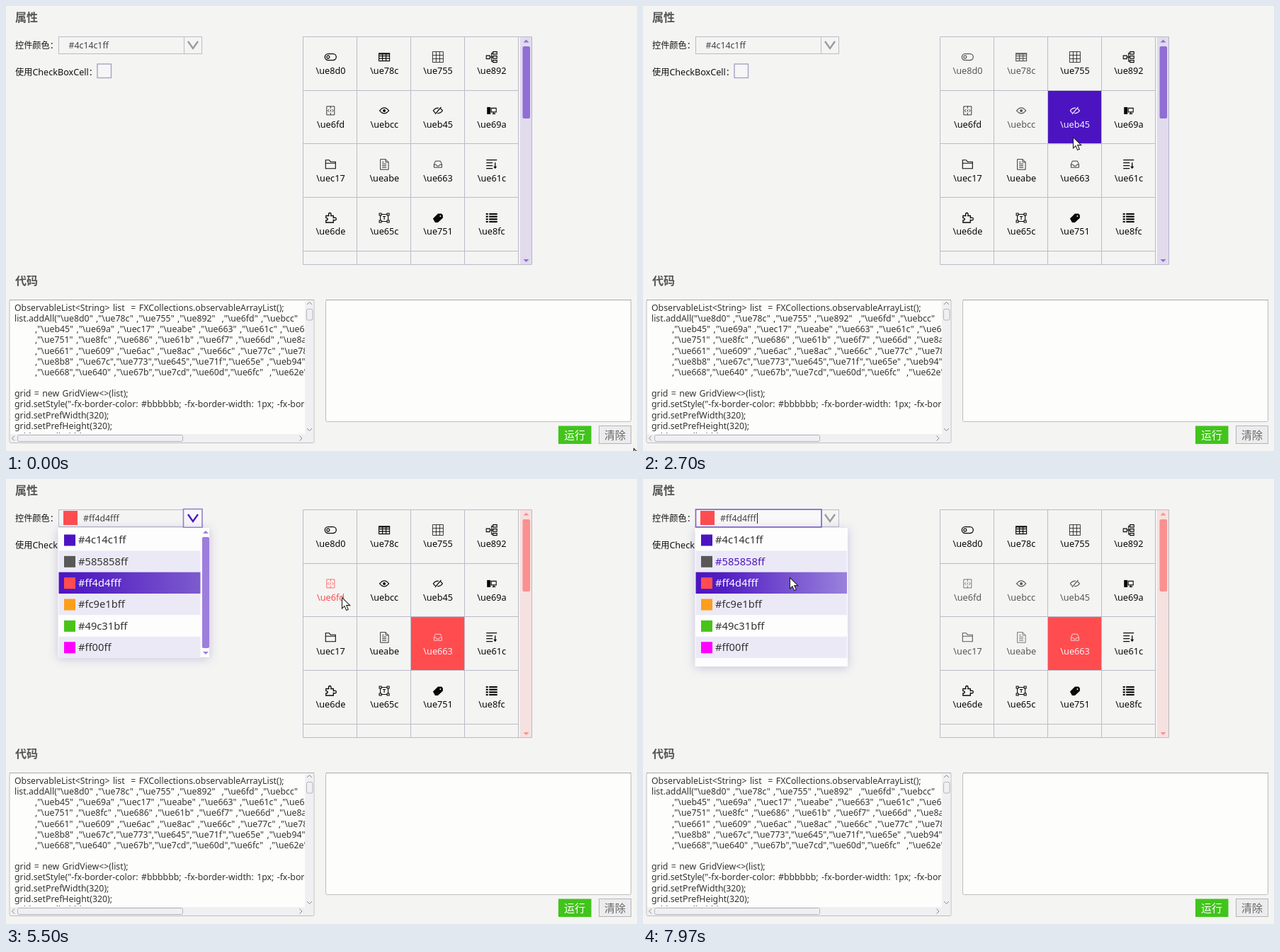
Write an HTML page that moves like this. It is 891 px wide and 629 px high and loops after 8000 ms.

```html
<!DOCTYPE html>
<html lang="zh-CN">
<head>
<meta charset="utf-8">
<title>GridView</title>
<style>
  html, body { margin: 0; width: 100%; height: 100%; overflow: hidden; background: #f4f4f3; }
  svg { display: block; width: 100%; height: 100%; --accent: #4c14c1;
        font: 12.3px "Noto Sans", "Noto Sans CJK SC", "Noto Sans CJK", sans-serif; }
  text { white-space: pre; }
  .title { font-size: 16px; font-weight: bold; fill: #555; }
  .label { font-size: 12.2px; fill: #111; }
  .edge { fill: none; stroke: #bcbbc8; }
  .cells text { font-size: 12.7px; text-anchor: middle; fill: currentColor; }
  .cells .bg { fill: none; }
  .icon { fill: none; stroke: currentColor; stroke-width: 1.1; }
  .solid { fill: currentColor; stroke: none; }
  .thumb { fill: var(--accent); opacity: .54; }
  .track { fill: var(--accent); opacity: .11; }
  .purple { --accent: #4c14c1; }
  .code { word-spacing: 1.2px; fill: #333; }
  .area { fill: #fdfdfc; stroke: #bdbdc0; }
  .bar { fill: #f0f0f2; }
  .grip { fill: #f0f0f3; stroke: #b4b4bc; }
  .tick { fill: none; stroke: #888; }
  .rows text { font-size: 14.7px; }
  .popup { filter: drop-shadow(0 2px 7px rgba(70, 50, 140, .25)); }
  .button { font-size: 15px; text-anchor: middle; }
</style>
</head>
<body>
<svg viewBox="0 0 891 629" preserveAspectRatio="none">
  <defs>
    <clipPath id="codeClip"><rect x="6" y="417" width="416" height="187"/></clipPath>
    <linearGradient id="shine">
      <stop offset="0" stop-color="#4c14c1"/>
      <stop offset=".2" stop-color="#5320c3"/>
      <stop id="shineEnd" offset="1"/>
    </linearGradient>
  </defs>
  <rect width="891" height="629" fill="#f4f4f3"/>

  <text class="title" x="13" y="22">属性</text>
  <text class="title" x="13" y="394">代码</text>
  <text class="label" x="13" y="60">控件颜色：</text>
  <text class="label" x="13" y="98">使用<tspan font-size="12.6">CheckBoxCell</tspan>：</text>
  <rect id="check" x="129" y="82" width="19.5" height="19.5" fill="#f6f6f6" stroke-width="1.4"/>

  <rect class="edge" x="74.5" y="43.5" width="202" height="24"/>
  <path class="edge" d="M251.5 43v25"/>
  <rect id="focus" x="74.5" y="43" width="177.5" height="25" fill="#f8f8f8" stroke="#7a60c9" stroke-width="1.6"/>
  <rect id="buttonFocus" x="250.5" y="42.5" width="26.5" height="26" fill="#f8f7fc" stroke="#9381cf" stroke-width="1.6"/>
  <path id="chevron" d="M257 50l7 10 7-10" fill="none" stroke-width="2.4"/>
  <rect id="swatch" x="81" y="45" width="20" height="20" fill="#ff4d4f"/>
  <text id="value" y="60" fill="#444"></text>
  <path id="caret" d="M161.5 48v15" stroke="#222"/>

  <g id="cells" class="cells"></g>
  <path class="edge" d="M419.5 43.5H742.5V365.5H419.5zM420 119.5H723M420 194.5H723M420 270.5H723M420 346.5H723
    M495.5 44V365M571.5 44V365M647.5 44V365M723.5 44V365"/>
  <rect class="track" x="726" y="44" width="16.5" height="321"/>
  <rect class="thumb" x="729.5" y="57" width="10.5" height="102" rx="2"/>
  <path class="thumb" d="M730.5 51.5l4-4 4 4zM730.5 358l4 4 4-4z"/>

  <rect class="area" x="5" y="415.5" width="430" height="202" rx="2"/>
  <g id="code" class="code" clip-path="url(#codeClip)"></g>
  <path class="bar" d="M422 417h12v188h-12zM6 605h428v12H6z"/>
  <rect class="grip" x="424.5" y="428.5" width="8.5" height="15.5" rx="2"/>
  <rect class="grip" x="16.5" y="606.5" width="233" height="9" rx="2"/>
  <path class="tick" d="M425 422l3.5-3.5 3.5 3.5M425 597l3.5 3.5 3.5-3.5M12 607.5l-3.5 3.5 3.5 3.5M414.5 607.5l3.5 3.5-3.5 3.5"/>

  <rect class="area" x="451.5" y="415.5" width="431" height="172" rx="2"/>
  <path d="M5 415.5H435M452 415.5H883" stroke="#a9a9ae"/>
  <rect x="780" y="593.5" width="46.5" height="25.5" fill="#41c41b"/>
  <text class="button" x="803" y="612" fill="#fff">运行</text>
  <rect x="837.5" y="593.5" width="45" height="25" fill="#ececee" stroke="#b5b5b9"/>
  <text class="button" x="860" y="612" fill="#666">清除</text>

  <g id="popup" class="purple">
    <rect id="sheet" class="popup" x="73.5" y="69" fill="#fdfdfd"/>
    <g id="rows" class="rows"></g>
    <g id="popupBar">
      <rect class="thumb" x="277" y="82" width="10" height="157" rx="2"/>
      <path class="thumb" d="M278 77l4-4 4 4zM278 244l4 4 4-4z"/>
    </g>
  </g>
  <path id="cursor" d="M.5.5v15.5l3.5-3.4 2.6 6 2.7-1.2-2.6-5.8h5z" fill="#fff" stroke="#222" stroke-width="1.1"/>
</svg>
<script>
const $ = id => document.getElementById(id);
const set = (el, attrs) => { for (const k in attrs) el.setAttribute(k, attrs[k]); return el; };
const add = (parent, tag, attrs = {}, content = '') => {
  const el = set(document.createElementNS('http://www.w3.org/2000/svg', tag), attrs);
  if (tag === 'text') el.textContent = content; else el.innerHTML = content;
  return parent.appendChild(el);
};
const show = (id, on) => { $(id).style.display = on ? '' : 'none'; };

const path = (d, width = 1.1) => `<path d="${d}" stroke-width="${width}"/>`;
const thin = d => path(d, .8);
const solid = d => `<path d="${d}" class="solid"/>`;

const icons = [
  ['e8d0', path('M-3.5-4.5H3.5a4.5 4.5 0 0 1 0 9H-3.5a4.5 4.5 0 0 1 0-9z', 1.3) + path('M-1.5 0a2 2 0 1 1-4 0a2 2 0 1 1 4 0z')],
  ['e78c', path('M-7.5-5h15V5.500h-15zM-7.500-1.500h15M-7.500 2h15M-2.500-5V5.500M2.500-5V5.500'.replace(/00/g, '')) + solid('M-8-5.500H8v2H-8z')],
  ['e755', thin('M-7.5-7.5h15v15h-15zM-7.5-2.5h15M-7.5 2.5h15M-2.5-7.5v15M2.5-7.5v15')],
  ['e892', path('M-7.5-2h5v4.500h-5zM2-7.5h5.5v3.500H2zM2-1.500h5.500v3.500H2zM2 4.500h5.500v3H2zM-2.500 0H2M2-5.500H0V6H2')],
  ['e6fd', thin('M-5.5-6h11v12h-11zM0-6v3M0-1.5v3M0 3v3M-2-2l-2 2 2 2M2-2l2 2-2 2')],
  ['ebcc', path('M-6.5 0Q0-8 6.5 0Q0 8-6.5 0z', 1.3) + solid('M-2 0a2 2 0 1 0 4 0a2 2 0 1 0-4 0z')],
  ['eb45', path('M1-3.8Q-4-4-6.5 0Q-5.5 2-3.5 3M-1 3.8Q4 4 6.5 0Q5.5-2 3.5-3') + path('M-4 5L4.5-5M-1 1.5L1.5-1.5', 1.3)],
  ['e69a', solid('M-6.5-5h5V5h-5z') + path('M-.5-3.500h7V2h-7zM3 2v2.500M1 4.500h4.500')],
  ['ec17', path('M-7 6v-12h5l2 2.5H7V6zM-7-1.5H7')],
  ['eabe', thin('M-5.5-7H2l4 4V7.5H-5.5zM2-7v4h4M-3-.5H3M-3 2H3M-3 4.5H3M-3-3H-.5')],
  ['e663', thin('M-5.5 0l2-4.5h7l2 4.5v4.5h-11zM-5.5.5h3l1 2h3l1-2h3')],
  ['e61c', path('M-7.5-6h15M-7.5-2h9M-7.5 2h9M-7.5 6h9M5-2.5v7', 1.3) + solid('M2.5 3h5L5 6.5z')],
  ['e6de', path('M-6.5-3h4q-1-4 1.5-4t1.5 4H4v3q4-1 4 1.5T4 3v3.5H-6.500v-3q2.500 0 2.500-1.700t-2.500-1.700z', 1.3)],
  ['e65c', path('M-7-6.500h3v3h-3zM4-6.500h3v3H4zM-7 3.500h3v3h-3zM4 3.500h3v3H4zM-4-5H4M-4 5H4M-5.500-3.500v7M5.500-3.500v7M-2-2h4M0-2v4.500')],
  ['e751', solid('M-7 1L0-6H5L7-4V0L0 6.5H-4z') + '<circle cx="3.5" cy="-2.5" r="1" fill="#f4f4f3" stroke="none"/>'],
  ['e8fc', path('M-8-5.500h3M-3.500-5.500H8M-8-1.800h3M-3.500-1.800H8M-8 1.900h3M-3.500 1.900H8M-8 5.500h3M-3.500 5.500H8', 2.2)]
];
const CELL = 75.8, LEFT = 420, TOP = 43.5;

const cells = icons.map(([name, art], i) => {
  const x = LEFT + (i % 4) * CELL, y = TOP + Math.floor(i / 4) * CELL;
  const group = add($('cells'), 'g');
  const bg = add(group, 'rect', { class: 'bg', x, y, width: CELL, height: CELL });
  add(group, 'g', { class: 'icon', transform: `translate(${x + 38.3} ${y + 28.6})` }, art);
  add(group, 'text', { x: x + 38.5, y: y + 52.5 }, '\\u' + name);
  return { group, bg };
});

const codeLines = String.raw`ObservableList<String> list  = FXCollections.observableArrayList();
list.addAll("\ue8d0" ,"\ue78c" ,"\ue755" ,"\ue892"  ,"\ue6fd" ,"\uebcc"
,"\ueb45" ,"\ue69a" ,"\uec17" ,"\ueabe" ,"\ue663" ,"\ue61c" ,"\ue6de"
,"\ue751" ,"\ue8fc" ,"\ue686" ,"\ue61b" ,"\ue6f7" ,"\ue66d" ,"\ue8ac"
,"\ue661" ,"\ue609" ,"\ue6ac" ,"\ue8ac" ,"\ue66c" ,"\ue77c" ,"\ue78c"
,"\ue8b8" ,"\ue67c","\ue773","\ue645","\ue71f","\ue65e" ,"\ueb94"
,"\ue668","\ue640" ,"\ue67b","\ue7cd","\ue60d","\ue6fc"  ,"\ue62e"

grid = new GridView<>(list);
grid.setStyle("-fx-border-color: #bbbbbb; -fx-border-width: 1px; -fx-border
grid.setPrefWidth(320);
grid.setPrefHeight(320);
grid.setCellWidth(75);`.split('\n');
codeLines.forEach((line, i) =>
  add($('code'), 'text', { x: line[0] === ',' ? 41 : 12, y: 431 + i * 15.16 }, line));

const colors = ['#4c14c1ff', '#585858ff', '#ff4d4fff', '#fc9e1bff', '#49c31bff', '#ff00ff'];
const ROW = 30.35, ROWS_TOP = 71;
const rows = colors.map((color, i) => {
  const y = ROWS_TOP + i * ROW;
  const bg = add($('rows'), 'rect', { x: 74.5, y, height: ROW });
  add($('rows'), 'rect', { x: 82, y: y + 7.5, width: 16, height: 16, fill: color.slice(0, 7) });
  return { bg, label: add($('rows'), 'text', { x: 102, y: y + 20.3 }, color) };
});

// Pointer legs: start, end, target x, y, optional bend x, y
const LOOP = 8000, RECOLOR = 4700, REOPEN = 7720;
const start = [886, 625];
const legs = [
  [30, 800, 217, 110, 300, 600],
  [930, 1570, 460, 87, 340, 10],
  [1800, 2600, 607, 185],
  [2700, 3030, 605, 238],
  [3200, 3630, 261, 53, 440, 205],
  [3870, 4070, 220, 99],
  [4070, 4670, 205, 148],
  [4700, 5500, 474, 167],
  [5530, 6330, 604, 225, 610, 150],
  [6370, 6930, 136, 124],
  [6930, 7130, 139, 96],
  [7470, 7690, 204, 56],
  [REOPEN, 7970, 207, 139]
];

function pointer(t) {
  let [x, y] = start;
  for (const [from, to, tx, ty, bx = (x + tx) / 2, by = (y + ty) / 2] of legs) {
    if (t < from) break;
    const p = Math.min(1, (t - from) / (to - from));
    const k = from === REOPEN ? p : p * p * (3 - 2 * p), r = 1 - k;
    x = r * r * x + 2 * r * k * bx + k * k * tx;
    y = r * r * y + 2 * r * k * by + k * k * ty;
    if (p < 1) break;
  }
  return [x, y];
}

function cellAt(t) {
  const [x, y] = pointer(t);
  const col = Math.floor((x - LEFT) / CELL), row = Math.floor((y - TOP) / CELL);
  return col >= 0 && col < 4 && row >= 0 && row < 4 ? row * 4 + col : -1;
}

function draw(t) {
  const red = t >= RECOLOR;
  const accent = red ? '#ff4d4f' : '#4c14c1';
  document.querySelector('svg').style.setProperty('--accent', accent);

  const [x, y] = pointer(t);
  set($('cursor'), { transform: `translate(${x} ${y})` });

  // Cells left by the pointer stay grey until the accent changes
  const visited = new Set();
  for (let s = red ? RECOLOR : 0; s < t; s += 10) visited.add(cellAt(s));
  const hover = cellAt(t);
  const selected = t < 2680 ? -1 : t < 3200 ? 6 : 10;
  cells.forEach(({ group, bg }, i) => {
    bg.style.fill = i === selected ? accent : 'none';
    group.style.color = i === selected ? '#f4f0fb' : i === hover ? accent : visited.has(i) ? '#585858' : '#080808';
  });

  const dropped = t >= 3870 && t < 5530;
  const editing = t >= REOPEN;
  const overButton = x > 251 && x < 277 && y > 43 && y < 68;
  const active = dropped || overButton;
  show('buttonFocus', active);
  set($('chevron'), { stroke: active ? '#4c14c1' : '#9b9b9f' });
  show('focus', editing);
  show('caret', editing);
  show('swatch', red);
  $('value').textContent = red ? colors[2] : colors[0];
  set($('value'), { x: red ? 109 : 88.5 });
  const overCheck = x > 129 && x < 149 && y > 82 && y < 102;
  set($('check'), { stroke: overCheck ? '#7a60c9' : '#aaa3c2' });

  show('popup', dropped || editing);
  show('popupBar', dropped);
  set($('sheet'), { width: editing ? 215.5 : 213.5, height: editing ? 196 : 183 });
  const [hx, hy] = pointer(t - 60);
  const hoverRow = hx > 74 && hx < 288 ? Math.floor((hy - ROWS_TOP) / ROW) : -1;
  const chosen = red ? 2 : 0;
  rows.forEach(({ bg, label }, i) => {
    set(bg, {
      width: editing ? 213.5 : 200,
      fill: i === chosen ? 'url(#shine)' : i % 2 ? '#ece9f7' : '#fdfdfd'
    });
    set(label, { fill: i === chosen ? '#fff' : i === hoverRow ? '#4c14c1' : '#333' });
  });
  set($('shineEnd'), { 'stop-color': editing ? '#9a82dd' : hoverRow === chosen ? '#ac95e0' : '#7d5bcd' });
}

const origin = performance.now();
function tick() {
  draw((performance.now() - origin) % LOOP);
  requestAnimationFrame(tick);
}
tick();
</script>
</body>
</html>
```
